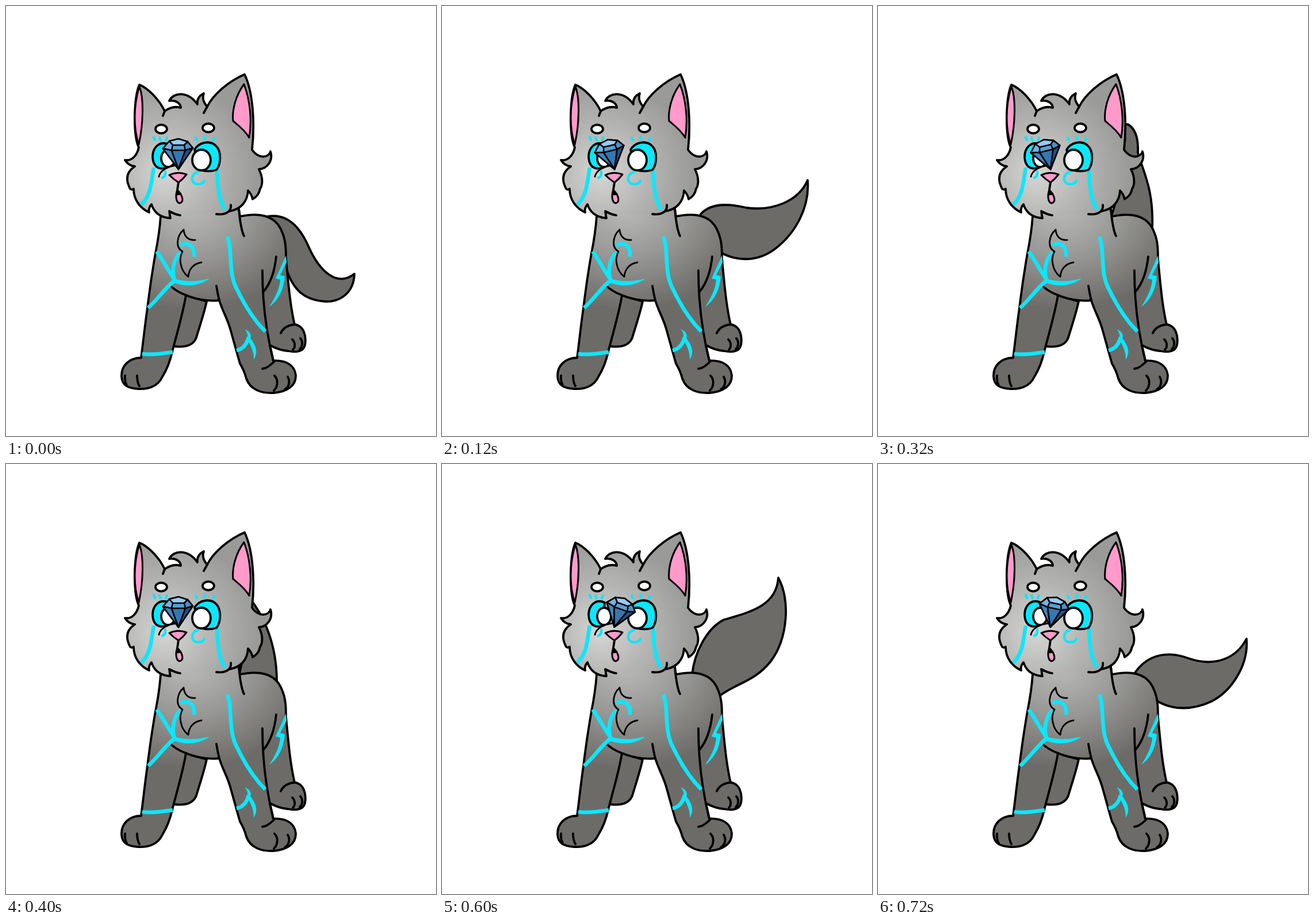
An HTML page for the animation above (0.8 s loop, 748 by 748 pixels).

```html
<!DOCTYPE html>
<html lang="en">
<head>
<meta charset="utf-8">
<title>Cat wagging its tail</title>
<style>
html, body { margin: 0; width: 100%; height: 100%; overflow: hidden; background: #fff; }
svg { display: block; width: 100%; height: 100%; }
path, ellipse { stroke: #000; stroke-width: 3.8; stroke-linecap: round; stroke-linejoin: round; }
.line { fill: none; }
.fine { stroke-width: 2.8; }
.dark { fill: #6d6b67; }
.pink { fill: #ff9acb; stroke-width: 3; }
.glow { fill: none; stroke: #0ce7fb; stroke-width: 6.6; stroke-linecap: butt; }
.thin { stroke-width: 4.5; stroke-linecap: round; }
.blade { fill: #0ce7fb; stroke: none; }
.iris { fill: #0ce7fb; }
.white { fill: #fff; }
#gem path { stroke-width: 2.6; }
</style>
</head>
<body>
<svg viewBox="0 0 748 748">
  <defs>
    <radialGradient id="fur" gradientUnits="userSpaceOnUse" cx="278" cy="290" r="160">
      <stop offset="0" stop-color="#d6d6d5"/>
      <stop offset=".5" stop-color="#b5b5b3"/>
      <stop offset="1" stop-color="#9a9a98"/>
    </radialGradient>
    <radialGradient id="coat" gradientUnits="userSpaceOnUse" cx="0" cy="0" r="1"
        gradientTransform="translate(320 350) scale(215 180)">
      <stop offset="0" stop-color="#bbbbb9"/>
      <stop offset=".5" stop-color="#969694"/>
      <stop offset="1" stop-color="#6d6b67"/>
    </radialGradient>
  </defs>

  <path id="tail" class="dark"/>

  <!-- body -->
  <path class="dark" d="M313 503L349 514C345 533 336 560 331 577C325 592 310 594 293 592"/>
  <path fill="url(#coat)" d="M285 345L269 366C267 395 263 415 260 430C253 470 249 500 246 525C241 560 238 590 235 612
    C215 612 200 625 201 645C202 660 212 665 230 666C251 667 265 660 272 645C280 632 285 620 289 602
    C297 570 308 535 313 503C330 510 350 514 371 512C377 532 386 545 391 565C398 590 402 605 407 622
    C413 632 416 640 418 648C425 668 445 674 465 673C490 671 505 660 504 642C502 625 488 616 465 617
    L459 590C468 595 478 599 490 600C505 603 517 602 520 590C523 574 518 556 502 554
    C494 520 491 480 487 440C487 425 487 410 481 395C470 363 440 359 407 366L405 353"/>
  <path class="line" d="M284 485C292 493 302 499 313 503M366 487Q368 500 371 512
    M446 460C446 510 452 565 465 617M470 436C467 465 458 485 448 497M405 353C407 375 409 390 414 400
    M207 643Q206 652 210 660M228 643Q228 654 232 661M446 631Q454 631 467 618
    M467 643C474 650 473 662 466 669M490 645C495 653 492 663 485 667
    M478 569C483 558 492 555 502 554M498 580C504 586 503 594 499 598M512 578C517 584 516 592 511 597"/>

  <!-- chest and leg markings -->
  <path class="glow" d="M303 416C316 410 329 416 327 436M304 428C291 440 288 460 293 478
    M262 427C272 440 282 460 294 477M296 476C280 485 265 510 247 525
    M385 401C395 425 385 465 403 495C415 520 430 545 451 566
    M237 605C255 608 275 604 290 602M401 599Q417 596 422 576"/>
  <path class="blade" d="M291 474C315 481 335 479 354 474C335 488 312 489 292 481Z
    M415 562C427 567 427 575 425 578C435 590 439 603 431 615C431 600 426 590 419 580Q423 571 415 562Z
    M487 434L488 446L477 468L485 470C483 495 473 513 458 523C468 508 476 492 477 476L469 474Z"/>
  <path class="line fine" d="M329 407C316 408 310 400 309 389C297 400 294 420 307 427
    C300 440 303 460 317 471C318 458 326 448 340 446"/>

  <!-- head -->
  <path fill="url(#fur)" d="M303 364C297 363 291 361 284 357C285 362 285 366 286 369C270 368 258 360 253 345
    C249 350 248 355 249 359C234 352 222 338 222 318C219 320 217 319 216 318C208 303 209 289 224 279
    C216 278 210 273 207 268C219 270 228 260 231 246C221 225 222 160 232 137C248 143 268 165 276 183
    C284 177 294 174 304 177C304 170 296 163 284 165C291 150 316 147 333 171C332 163 336 156 344 152
    C341 162 344 168 350 175C360 155 385 132 415 119C430 150 433 205 428 250C440 267 457 264 460 253
    C465 268 455 283 440 284C448 300 446 312 442 318C440 327 437 331 429 336C428 330 425 325 421 321
    C420 341 408 354 388 357C382 362 373 363 366 362"/>
  <path class="line" d="M276 183L273 191M350 175L344 186M388 357Q392 352 391 346"/>
  <path class="pink" d="M232 140C240 160 239 205 231 241C222 215 221 175 232 140Z
    M414 136C425 165 428 200 423 229C415 215 402 206 395 200C393 180 400 155 414 136Z"/>

  <!-- face -->
  <ellipse class="white" cx="270" cy="214" rx="10" ry="7.5"/>
  <ellipse class="white" cx="352" cy="212" rx="10" ry="7.5"/>
  <path class="glow thin" d="M257 228L259 233M267 229L269 234M280 229L278 234
    M330 229L332 233M346 227L346 232M362 230L360 234"/>
  <path class="glow" d="M257 281C252 310 252 330 235 346M366 282C370 305 366 330 381 354"/>
  <path class="iris" d="M283 241C268 234 255 245 255 263C256 279 265 286 280 281Z"/>
  <ellipse class="white" cx="282" cy="265" rx="12" ry="15"/>
  <path class="iris" d="M328 250C336 236 356 233 366 244C375 254 374 275 366 285Q355 289 340 286Z"/>
  <ellipse class="white" cx="340" cy="268" rx="16" ry="18"/>
  <path class="fine" fill="url(#fur)" d="M266 297C268 286 281 279 297 277"/>
  <path class="glow thin" d="M277 288C278 293 276 297 272 299M334 289C321 291 320 309 334 310Q343 310 345 304"/>
  <path class="pink" d="M284 294Q299 287 314 293Q308 301 300 307Q292 302 284 294Z"/>
  <path class="line" d="M300 307L298 320"/>
  <path class="pink" d="M298 320C294 330 296 342 302 343C310 341 308 330 298 320Z"/>
  <path class="fine" d="M298 320L297 328L304 327Z"/>

  <g id="gem">
    <path fill="#5b9fd0" d="M284 235L300 231L316 236L325 247L300 284L273 248Z"/>
    <path fill="#96cbf4" d="M284 235L300 231L316 236L310 242L290 242Z"/>
    <path fill="#72b3e6" d="M273 248L284 235L290 242L288 251Z"/>
    <path fill="#4b90c8" d="M310 242L316 236L325 247L312 251Z"/>
    <path fill="#3f86c0" d="M273 248L288 251L300 284Z"/>
    <path fill="#3478b2" d="M288 251L312 251L300 284Z"/>
    <path fill="#1f5384" d="M312 251L325 247L300 284Z"/>
  </g>
</svg>
<script>
// Each pose: end time in ms, gem tilt in degrees, tail outline.
const poses = [
  [120, 0, "M455 366C490 360 512 385 527 420C545 460 575 490 606 466C605 500 580 515 556 514C520 512 499 495 487 455"],
  [200, -13, "M450 362C470 340 505 345 530 351C575 357 620 340 636 303C640 350 615 395 580 422C550 445 515 445 485 429"],
  [320, -21, "M436 367C440 330 462 290 490 277C540 265 580 260 583 211C605 245 600 310 570 350C545 385 510 385 482 407"],
  [400, -13, "M405 368C415 340 420 310 420 280L420 210Q428 205 435 206C450 215 453 235 452 255C462 290 480 320 477 388"],
  [520, 0, "M405 368C412 340 418 310 418 280L415 235L425 235C445 260 472 310 471 382"],
  [600, 12, "M421 368C417 320 440 270 460 250C480 235 490 210 487 176C505 200 520 230 524 270C527 310 500 330 487 350Q477 367 473 384"],
  [720, 20, "M435 367C439 327 461 286 490 271C540 257 582 245 585 198C606 235 602 303 572 343C545 378 510 382 482 404"],
  [800, 12, "M447 363C470 330 505 325 540 338C590 355 625 335 641 304C645 350 615 395 580 413C550 427 515 430 485 412"]
];
const tail = document.getElementById("tail");
const gem = document.getElementById("gem");

function draw(now) {
  const t = now % 800;
  const [, tilt, shape] = poses.find(([end]) => t < end);
  tail.setAttribute("d", shape);
  gem.setAttribute("transform", `rotate(${tilt} 301 283)`);
  requestAnimationFrame(draw);
}
draw(0);
</script>
</body>
</html>
```
